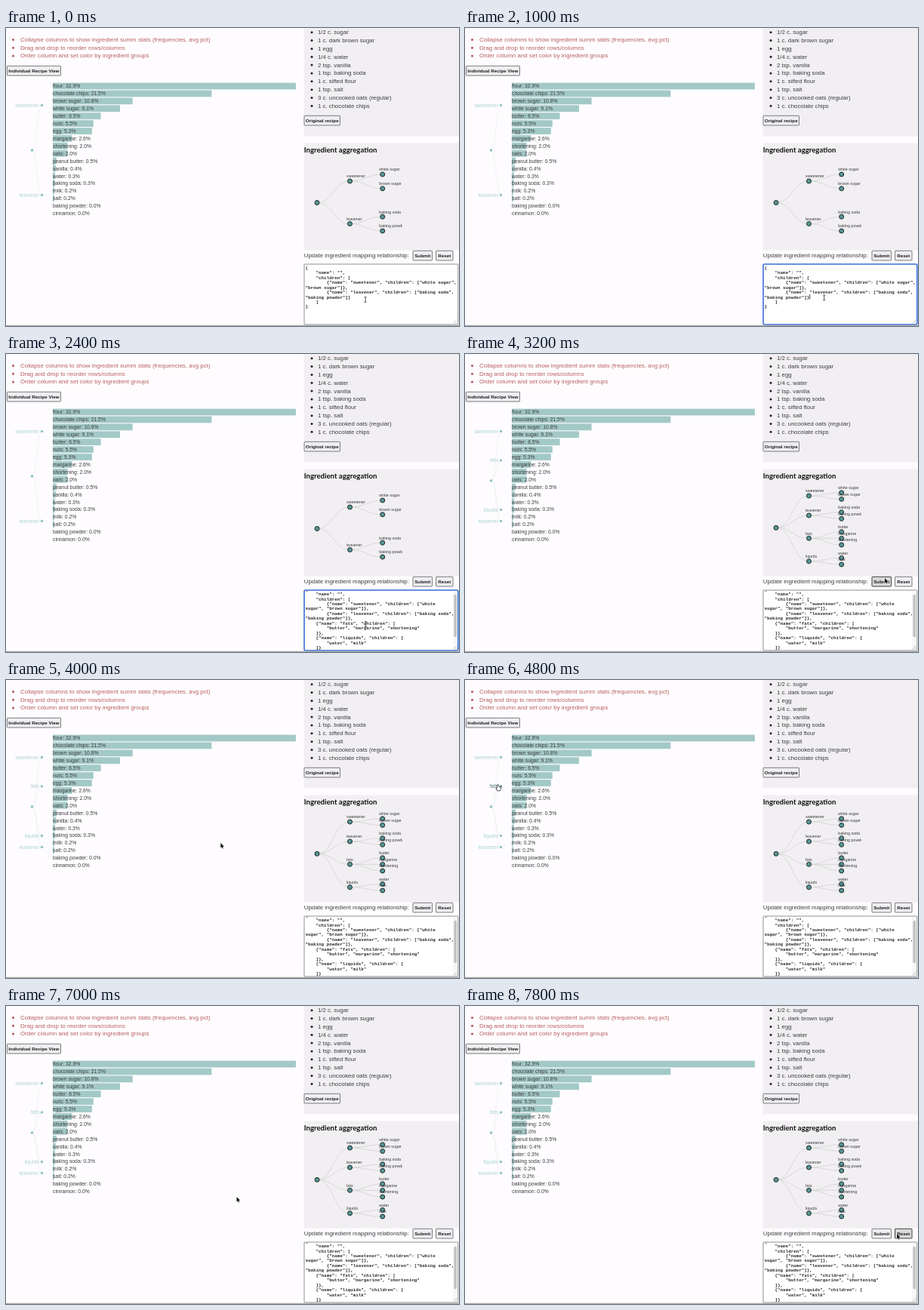
An HTML page with a canvas that plays this animation: 600 by 395 pixels, repeating every 8 s.

```html
<!DOCTYPE html>
<html lang="en">
<head>
<meta charset="utf-8">
<title>Ingredient aggregation</title>
<style>
  html, body { margin: 0; width: 100%; height: 100%; overflow: hidden; background: #fefcfe; }
  canvas { display: block; width: 600px; height: 395px; }
</style>
</head>
<body>
<canvas id="stage"></canvas>
<script>
const W = 600, H = 395, LOOP = 8000, STEP = 200;
const FOCUS = 400, PASTE = 1600, SUBMIT = 3000;
const SANS = '"Liberation Sans", Arial, sans-serif';
const MONO = '"Liberation Mono", "Courier New", monospace';
const HEAD = 'Lato, "Open Sans", sans-serif';
const PAGE = '#fefcfe', PANEL = '#f1eff1', TEAL = '#a3c9c7', INK = '#3c3c3e';

const canvas = document.getElementById('stage');
const ctx = canvas.getContext('2d');
const dpr = window.devicePixelRatio || 1;
canvas.width = W * dpr;
canvas.height = H * dpr;

const notes = [
  'Collapse columns to show ingredient summ stats (frequencies, avg pct)',
  'Drag and drop to reorder rows/columns',
  'Order column and set color by ingredient groups'
];
const recipe = [
  '1/2 c. sugar', '1 c. dark brown sugar', '1 egg', '1/4 c. water', '2 tsp. vanilla',
  '1 tsp. baking soda', '1 c. sifted flour', '1 tsp. salt',
  '3 c. uncooked oats (regular)', '1 c. chocolate chips'
];
const shares = [
  ['flour', 32.9], ['chocolate chips', 21.5], ['brown sugar', 10.8], ['white sugar', 9.1],
  ['butter', 6.5], ['nuts', 5.5], ['egg', 5.3], ['margarine', 2.6], ['shortening', 2],
  ['oats', 2], ['peanut butter', 0.5], ['vanilla', 0.4], ['water', 0.3],
  ['baking soda', 0.3], ['milk', 0.2], ['salt', 0.2], ['baking powder', 0], ['cinnamon', 0]
];

// Height of each group's dot in the left tree
const groupY = { sweetener: 102.5, fats: 141, liquids: 206.5, leavener: 221.5 };

// Each group: name, height, first child's height, child spacing, children
const before = {
  rootY: 162, names: ['sweetener', 'leavener'], top: 231.5,
  groups: [
    ['sweetener', 203, 194, 18.8, ['white sugar', 'brown sugar']],
    ['leavener', 259.5, 250.2, 18.8, ['baking soda', 'baking powder']]
  ],
  code: [
    '{',
    '    "name": "",',
    '    "children": [',
    '        {"name": "sweetener", "children": ["white sugar",',
    '"brown sugar"]},',
    '        {"name": "leavener", "children": ["baking soda",',
    '"baking powder"]}',
    '    ]',
    '}'
  ]
};
const after = {
  rootY: 168, names: Object.keys(groupY), top: 230.3,
  groups: [
    ['sweetener', 188, 183.8, 8.6, ['white sugar', 'brown sugar']],
    ['leavener', 214, 209.7, 8.6, ['baking soda', 'baking powder']],
    ['fats', 244.3, 235.8, 8.6, ['butter', 'margarine', 'shortening']],
    ['liquids', 274.7, 270.4, 8.6, ['water', 'milk']]
  ],
  code: [
    '{',
    '    "name": "",',
    '    "children": [',
    '        {"name": "sweetener", "children": ["white',
    'sugar", "brown sugar"]},',
    '        {"name": "leavener", "children": ["baking soda",',
    '"baking powder"]},',
    '    {"name": "fats", "children": [',
    '        "butter", "margarine", "shortening"',
    '    ]},',
    '    {"name": "liquids", "children": [',
    '        "water", "milk"',
    '    ]}'
  ]
};

// Pointer path: time, x, y
const path = [
  [0, 476, 360], [400, 475.5, 357.3], [2400, 476.5, 358], [2600, 482, 354], [3000, 556, 297],
  [3400, 556, 297], [3600, 525, 293], [4400, 43.5, 139], [5000, 43.5, 139],
  [5600, 44, 206], [6400, 44, 206], [7600, 567, 300], [7800, 572, 302], [8000, 572, 302]
];

function pointerAt(t) {
  const i = path.findIndex(p => p[0] > t);
  const [t0, x0, y0] = path[i - 1], [t1, x1, y1] = path[i];
  const k = (t - t0) / (t1 - t0), e = k * k * (3 - 2 * k);
  return [x0 + (x1 - x0) * e, y0 + (y1 - y0) * e];
}

// Set large and scaled down, so that small type keeps its true advances
function text(s, x, y, size, { color = INK, font = SANS, weight = 400, align = 'left' } = {}) {
  ctx.save();
  ctx.translate(x, y + size * 0.35);
  ctx.scale(0.1, 0.1);
  ctx.font = `${weight} ${size * 10}px ${font}`;
  ctx.textAlign = align;
  ctx.fillStyle = color;
  ctx.fillText(s, 0, 0);
  ctx.restore();
}

function rect(x, y, w, h, color) {
  ctx.fillStyle = color;
  ctx.fillRect(x, y, w, h);
}

function box(x, y, w, h, r, fill, stroke, line = 1) {
  ctx.beginPath();
  ctx.roundRect(x, y, w, h, r);
  ctx.fillStyle = fill;
  ctx.fill();
  ctx.strokeStyle = stroke;
  ctx.lineWidth = line;
  ctx.stroke();
}

function dot(x, y, r, fill, stroke) {
  ctx.beginPath();
  ctx.arc(x, y, r, 0, Math.PI * 2);
  ctx.fillStyle = fill;
  ctx.fill();
  if (!stroke) return;
  ctx.strokeStyle = stroke;
  ctx.lineWidth = 1;
  ctx.stroke();
}

function link(x0, y0, x1, y1, color) {
  const mid = (x0 + x1) / 2;
  ctx.beginPath();
  ctx.moveTo(x0, y0);
  ctx.bezierCurveTo(mid, y0, mid, y1, x1, y1);
  ctx.strokeStyle = color;
  ctx.lineWidth = 0.8;
  ctx.stroke();
}

function button(label, x, y, w, pressed) {
  box(x + 0.5, y + 0.3, w - 1, 12.7, 0.6, pressed ? '#dad9da' : '#efeef0', pressed ? '#3f3f42' : '#7c7b7e');
  text(label, x + w / 2, y + 6.8, 6.25, { align: 'center', color: '#1c1c1e', weight: 700 });
}

function drawNotes() {
  notes.forEach((s, i) => {
    const y = 15.3 + i * 10.7;
    dot(9.5, y + 0.3, 1.5, '#b35554');
    text(s, 19, y, 7.97, { color: '#b95f5e' });
  });
  button('Individual Recipe View', 1, 50, 72);
}

function drawChart() {
  shares.forEach(([name, pct], i) => {
    const y = 77.1 + i * 9.92;
    rect(62, y - 4.5, pct * 9.785, 8.8, TEAL);
    text(`${name}: ${pct.toFixed(1)}%`, 62, y, 6.8);
  });
}

function drawGroups(state, hover) {
  state.names.forEach(n => link(34.5, state.rootY, 47.5, groupY[n], '#eef0f0'));
  dot(34.5, state.rootY, 1.8, '#8dc1be');
  state.names.forEach(n => {
    const on = n === hover;
    dot(47.5, groupY[n], 1.8, on ? '#5f9693' : '#94c6c3');
    text(n, 44, groupY[n], 6.9, { align: 'right', color: on ? '#4d7b79' : '#acd4d1' });
  });
}

function drawRecipe() {
  rect(394.5, 0, 205.5, 143.5, PANEL);
  recipe.forEach((s, i) => {
    const y = 5.4 + i * 10.85;
    dot(405, y + 0.3, 1.5, '#222');
    text(s, 413, y, 7.83);
  });
  button('Original recipe', 394.5, 116, 48.5);
}

function node(name, x, y) {
  dot(x, y, 3, '#579694', '#1d2b2b');
  text(name, x - 4.5, y - 6.4, 5.35);
}

function drawTree(state) {
  rect(394.5, 152.5, 205.5, 142, PANEL);
  text('Ingredient aggregation', 394.7, 161.4, 9.6, { font: HEAD, weight: 700, color: '#111' });
  ctx.save();
  ctx.beginPath();
  ctx.rect(395, 170, 130, 124);
  ctx.clip();
  for (const [, y, first, gap, kids] of state.groups) {
    link(412, state.top, 455.5, y, '#d3d2d3');
    kids.forEach((_, i) => link(455.5, y, 498.7, first + i * gap, '#d3d2d3'));
  }
  dot(412, state.top, 3, '#579694', '#1d2b2b');
  for (const [name, y] of state.groups) node(name, 455.5, y);
  for (const [, , first, gap, kids] of state.groups)
    kids.forEach((kid, i) => node(kid, 498.7, first + i * gap));
  ctx.restore();
}

function drawEditor(t) {
  const focus = t >= FOCUS && t < SUBMIT, pasted = t >= PASTE;
  const lines = (pasted ? after : before).code;
  const top = pasted ? 311.5 : 317.6;
  box(395, 313, 203.8, 80, focus ? 1.5 : 0.5, '#fff', focus ? '#3a6fd6' : '#858588', focus ? 1.6 : 0.9);
  ctx.save();
  ctx.beginPath();
  ctx.rect(396, 314, 202, 78);
  ctx.clip();
  lines.forEach((s, i) => text(s, 396.5, top + i * 6.48, 5.86, { font: MONO, weight: 700, color: '#2a2a2c' }));
  if (pasted) {
    rect(592, 314, 6, 78, '#f7f7f7');
    box(593.7, 319, 3, 56, 1.5, '#c2c2c3', '#c2c2c3', 0.6);
  } else if (focus) {
    rect(456.4, 353, 0.8, 6.5, '#111');
  }
  ctx.beginPath();
  for (const d of [2.5, 5]) {
    ctx.moveTo(597.5 - d, 391.5);
    ctx.lineTo(597.5, 391.5 - d);
  }
  ctx.strokeStyle = '#aaa';
  ctx.lineWidth = 0.6;
  ctx.stroke();
  ctx.restore();
}

function shape(points, fill, stroke, line) {
  ctx.beginPath();
  points.forEach(([x, y]) => ctx.lineTo(x, y));
  ctx.closePath();
  ctx.lineJoin = 'round';
  ctx.strokeStyle = stroke;
  ctx.lineWidth = line;
  ctx.stroke();
  ctx.fillStyle = fill;
  ctx.fill();
}

function drawPointer(t, hover) {
  const [x, y] = pointerAt(t);
  ctx.save();
  ctx.translate(x, y);
  if (t < 2600) {
    ctx.beginPath();
    for (const s of [-1, 1]) {
      ctx.moveTo(-1.5, 3.6 * s);
      ctx.quadraticCurveTo(0, 3.6 * s, 0, 2.6 * s);
      ctx.quadraticCurveTo(0, 3.6 * s, 1.5, 3.6 * s);
    }
    ctx.moveTo(0, -2.6);
    ctx.lineTo(0, 2.6);
    ctx.strokeStyle = '#222';
    ctx.lineWidth = 0.8;
    ctx.stroke();
  } else if (hover) {
    shape([[-0.7, 0.2], [0.5, 0.2], [0.9, 2.6], [3, 3], [3.7, 3.8], [3.4, 5.8], [2.8, 7.6],
      [-0.3, 7.6], [-2.2, 4.8], [-1.6, 4.2], [-0.6, 4.8]], '#fff', '#222', 1.3);
  } else {
    shape([[0, 0], [0, 6.6], [1.5, 5.3], [2.5, 7.6], [3.6, 7.1], [2.6, 4.9], [4.6, 4.8]], '#111', '#fff', 1);
  }
  ctx.restore();
}

function draw(t) {
  const state = t >= SUBMIT ? after : before;
  const hover = t >= 4400 && t < 5200 ? 'fats' : t >= 5600 && t < 6600 ? 'liquids' : '';
  ctx.setTransform(dpr, 0, 0, dpr, 0, 0);
  rect(0, 0, W, H, PAGE);
  drawNotes();
  drawGroups(state, hover);
  drawChart();
  drawRecipe();
  drawTree(state);
  text('Update ingredient mapping relationship:', 394.8, 301.3, 7.87);
  button('Submit', 538.5, 295, 26.5, t >= SUBMIT && t < 3400);
  button('Reset', 569, 295, 23.5, t >= 7800);
  drawEditor(t);
  rect(0, 393.8, W, 1.2, '#a9a8aa');
  drawPointer(t, hover);
}

const start = performance.now();
function tick() {
  const t = (performance.now() - start) % LOOP;
  draw(Math.floor(t / STEP) * STEP);
  requestAnimationFrame(tick);
}
tick();
</script>
</body>
</html>
```
